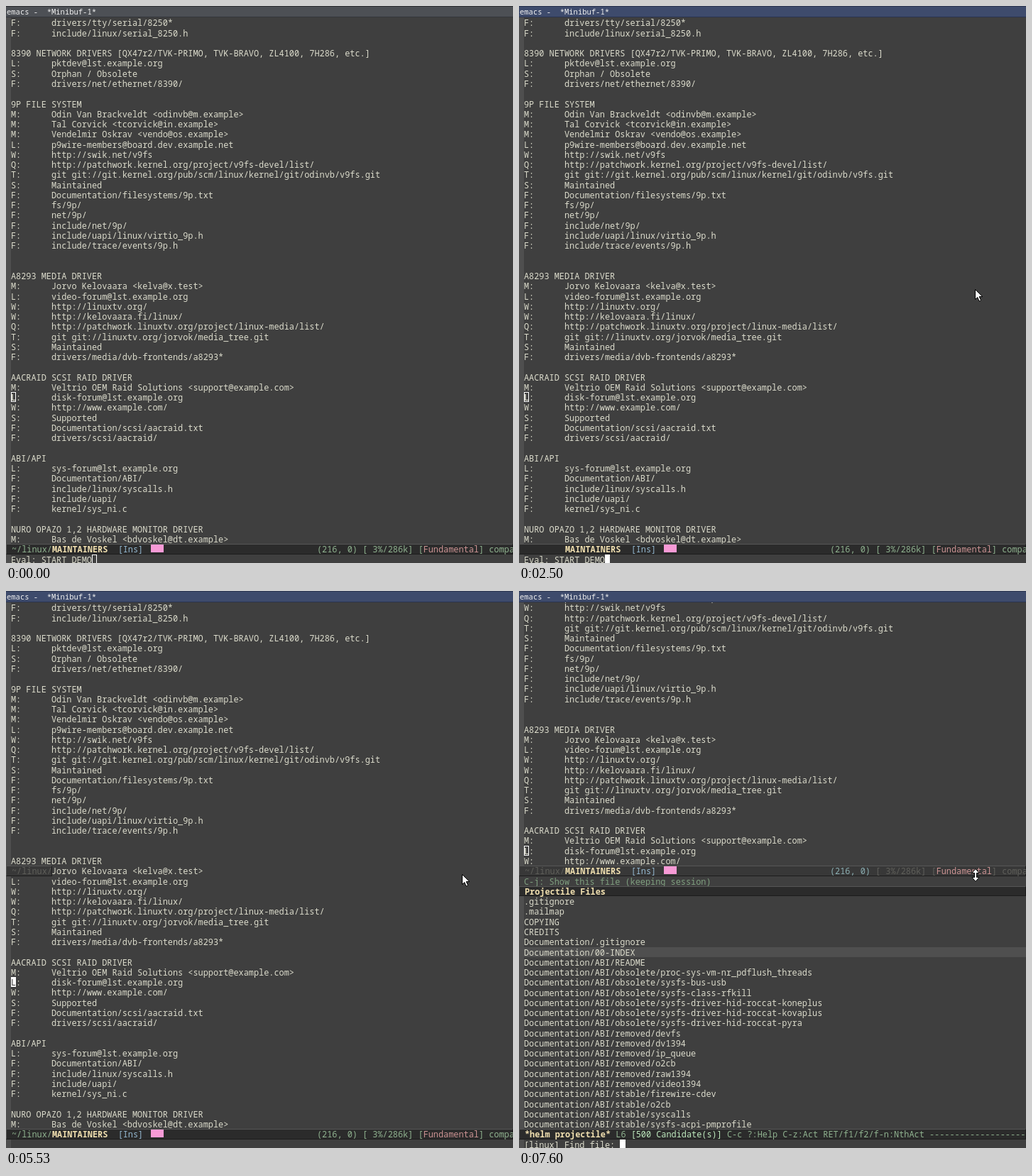
Recreate the animation shown at these times as an HTML page. Size 714x785 px, loop 8000 ms.

```html
<!DOCTYPE html>
<html lang="en">
<head>
<meta charset="utf-8">
<title>Emacs session</title>
<style>
html, body { margin: 0; width: 100%; height: 100%; overflow: hidden; background: #3f3f3f; }
#stage {
  --row: 14.27px;
  position: relative; width: 714px; height: 785px; overflow: hidden;
  background: linear-gradient(90deg, #4f4f4f 7px, #3f3f3f 7px);
  color: #dcdccc; font: 11.88px/14.27px "Noto Sans Mono", monospace;
}
#stage * { box-sizing: border-box; }
pre, .row, #win, #caption, svg, #cat, #pos { position: absolute; margin: 0; white-space: pre; font-family: inherit; }
#caption {
  left: 0; top: 0; width: 714px; height: 16px; padding-left: 1px;
  background: #4d5055; border-top: 1px solid #2c2e32; border-bottom: 1px solid #33363b;
  color: #f0f0f0; font-size: 10.5px; line-height: 14px;
}
.focus #caption { background: #3e4b6c; border-color: #2a3450; }
.row { left: 0; top: calc(16.4px + var(--r) * var(--row)); width: 714px; height: var(--row); padding-left: 7px; }
#win { left: 0; top: 16.4px; width: 714px; height: calc(52 * var(--row)); overflow: hidden; }
#buf { left: 7px; top: 0; }
.helm #win { height: calc(26 * var(--row)); }
.helm #buf { top: calc(-13 * var(--row)); }

.cursor { display: inline-block; width: 7.13px; height: 14px; vertical-align: top; box-shadow: inset 0 0 0 1px #fff; }
.filled { background: #fff; color: #3f3f3f; }
#point { position: absolute; left: 0; top: calc(37 * var(--row)); }

.bar { background: #2b2b2b; color: #8fb28f; border: 1px solid; border-color: #565656 #1c1c1c #1c1c1c #565656; line-height: 12.3px; }
.bar b, #head { color: #f0dfaf; }
#mode { --r: 52; }
#mode i { font-style: normal; color: #94b8d0; }
#mode em { font-style: normal; color: #cc9393; }
#pos { left: 437px; top: 0; }
#cat { left: 203px; top: 0; width: 18px; height: 11px; background: #f79ad6; }
.helm #mode, #ghost { --r: 26; background: #383838; color: #5f5f5a; }
.helm #pos u { color: #8cb0b4; }
u { text-decoration: none; }
#ghost { width: 65px; }
.blank #path { visibility: hidden; }

#panel { display: none; }
.helm #panel { display: block; }
#hint { --r: 27; color: #7f9f7f; background: #3f3f3f; }
#head { --r: 28; font-weight: bold; }
#sel { left: 7px; width: 707px; background: #4f4f4f; }
#files { left: 7px; top: calc(16.4px + 29 * var(--row)); }
#status { --r: 52; }
#status s { text-decoration: none; color: #bfebbf; }
#mini { --r: 53; }
svg { left: 0; top: 0; fill: #fff; stroke: #000; }
</style>
</head>
<body>
<div id="stage">
  <div id="caption"></div>
  <div id="win"><pre id="buf"></pre></div>
  <div id="ghost" class="row bar">~/linux/</div>
  <div id="mode" class="row bar"><span id="path">~/linux/</span><b>MAINTAINERS</b>  <i>[Ins]</i><span id="cat"></span><span id="pos"><u>(216, 0)</u> [ 3%/286k] [<em>Fundamental</em>] company</span></div>
  <div id="panel">
    <div id="hint" class="row">C-j: Show this file (keeping session)</div>
    <div id="head" class="row bar">Projectile Files</div>
    <div id="sel" class="row"></div>
    <pre id="files"></pre>
    <div id="status" class="row bar"><b>*helm projectile*</b> L<span id="num"></span> <s>[500 Candidate(s)]</s> C-c ?:Help C-z:Act RET/f1/f2/f-n:NthAct --------------------</div>
  </div>
  <div id="mini" class="row"><span id="prompt"></span><span id="caret" class="cursor"></span></div>
  <svg width="714" height="785">
    <path id="arrow" d="M642.5 399.5v14l3.2-3 2.4 5.5 2.5-1.1-2.4-5.3h4.6z"/>
    <path id="resize" d="M643 391.5l5 6h-3.5v6h3.5l-5 6-5-6h3.5v-6h-3.5z"/>
  </svg>
</div>
<script>
const $ = id => document.getElementById(id);

// A single capital followed by a space is a field tag.
const maintainers = `F drivers/tty/serial/8250*
F include/linux/serial_8250.h

8390 NETWORK DRIVERS [QX47r2/TVK-PRIMO, TVK-BRAVO, ZL4100, 7H286, etc.]
L pktdev@lst.example.org
S Orphan / Obsolete
F drivers/net/ethernet/8390/

9P FILE SYSTEM
M Odin Van Brackveldt <odinvb@m.example>
M Tal Corvick <tcorvick@in.example>
M Vendelmir Oskrav <vendo@os.example>
L p9wire-members@board.dev.example.net
W http://swik.net/v9fs
Q http://patchwork.kernel.org/project/v9fs-devel/list/
T git git://git.kernel.org/pub/scm/linux/kernel/git/odinvb/v9fs.git
S Maintained
F Documentation/filesystems/9p.txt
F fs/9p/
F net/9p/
F include/net/9p/
F include/uapi/linux/virtio_9p.h
F include/trace/events/9p.h


A8293 MEDIA DRIVER
M Jorvo Kelovaara <kelva@x.test>
L video-forum@lst.example.org
W http://linuxtv.org/
W http://kelovaara.fi/linux/
Q http://patchwork.linuxtv.org/project/linux-media/list/
T git git://linuxtv.org/jorvok/media_tree.git
S Maintained
F drivers/media/dvb-frontends/a8293*

AACRAID SCSI RAID DRIVER
M Veltrio OEM Raid Solutions <support@example.com>
L disk-forum@lst.example.org
W http://www.example.com/
S Supported
F Documentation/scsi/aacraid.txt
F drivers/scsi/aacraid/

ABI/API
L sys-forum@lst.example.org
F Documentation/ABI/
F include/linux/syscalls.h
F include/uapi/
F kernel/sys_ni.c

NURO OPAZO 1,2 HARDWARE MONITOR DRIVER
M Bas de Voskel <bdvoskel@dt.example>`;
$('buf').textContent = maintainers.replace(/^([A-Z]) /gm, '$1:      ');
$('buf').insertAdjacentHTML('beforeend', '<span id="point" class="cursor">L</span>');

const abi = (dir, names) => names.split(' ').map(n => `Documentation/ABI/${dir}/${n}`);
$('files').textContent = [
  '.gitignore', '.mailmap', 'COPYING', 'CREDITS',
  'Documentation/.gitignore', 'Documentation/00-INDEX', 'Documentation/ABI/README',
  ...abi('obsolete', 'proc-sys-vm-nr_pdflush_threads sysfs-bus-usb sysfs-class-rfkill ' +
    'sysfs-driver-hid-roccat-koneplus sysfs-driver-hid-roccat-kovaplus sysfs-driver-hid-roccat-pyra'),
  ...abi('removed', 'devfs dv1394 ip_queue o2cb raw1394 video1394'),
  ...abi('stable', 'firewire-cdev o2cb syscalls sysfs-acpi-pmprofile')
].join('\n');

const show = (id, on) => $(id).style.visibility = on ? 'visible' : 'hidden';
const setText = (id, s) => { if ($(id).textContent !== s) $(id).textContent = s; };
const downKeys = [7160, 7310, 7450, 7600];
const picked = (t, first) => 1 + [first, ...downKeys].filter(k => t >= k).length;

function draw(t) {
  const within = (a, b) => t >= a && t < b;
  const helm = t >= 5570, idle = within(2540, 5570);
  const stage = $('stage').classList;
  stage.toggle('focus', t >= 510);
  stage.toggle('blank', within(2500, 2540));
  stage.toggle('helm', helm);

  setText('caption', 'emacs - ' + (within(2540, 5530) ? '~/linux/MAINTAINERS' : ' *Minibuf-1*'));
  setText('prompt', helm ? '[linux] Find file: '
    : t < 2540 ? 'Eval: START DEMO'
    : t < 3840 ? 'Quit' : '');

  $('point').classList.toggle('filled', idle);
  $('caret').classList.toggle('filled', t >= 560);
  show('caret', !idle);
  show('ghost', within(5530, 5570));
  show('arrow', within(620, 5570));
  show('resize', helm);

  $('sel').style.setProperty('--r', 28 + picked(t, 6960));
  setText('num', String(picked(t, 7000)));
}

const start = performance.now();
function tick() {
  draw((performance.now() - start) % 8000);
  requestAnimationFrame(tick);
}
tick();
</script>
</body>
</html>
```
